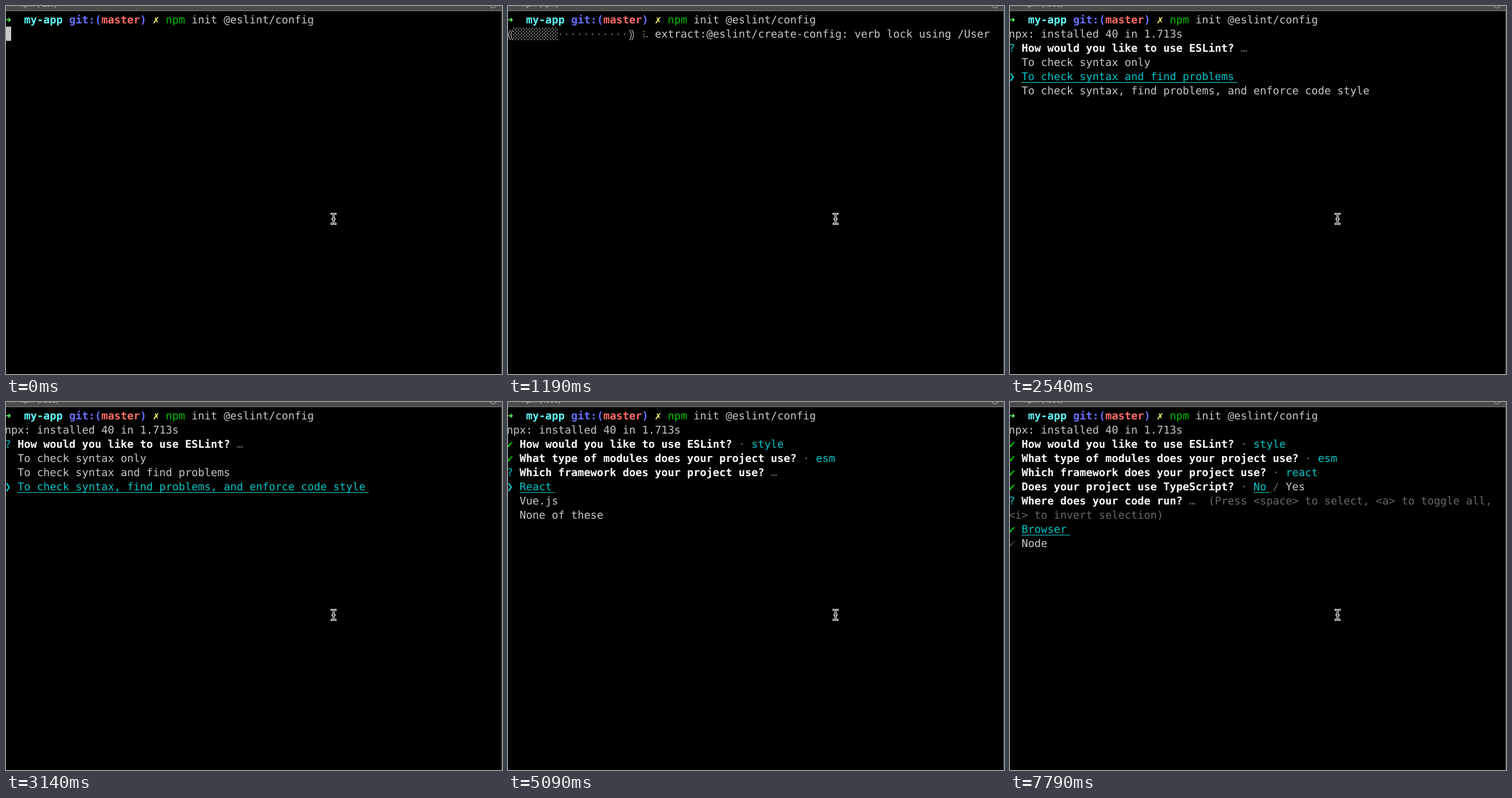
Recreate the animation shown at these times as an HTML page. Size 770 by 571 pixels, loop 8000 ms.

```html
<!DOCTYPE html>
<html lang="en">
<head>
<meta charset="utf-8">
<title>Terminal</title>
<style>
  html, body { margin: 0; width: 100%; height: 100%; overflow: hidden; background: #000; }
  svg { display: block; width: 770px; height: 571px; }
  text { white-space: pre; text-rendering: geometricPrecision; }
  .term { font: 16.61px "DejaVu Sans Mono", "Liberation Mono", monospace; }
  .bar { font: 11px Inter, "Liberation Sans", sans-serif; fill: #d2d2d2; }
</style>
</head>
<body>
<svg viewBox="0 0 770 571">
  <rect width="770" height="571"/>
  <rect x="769" width="1" height="571" fill="#4c4c4c"/>
  <rect width="770" height="7" fill="#4b4b4b"/>
  <rect y="7" width="770" height="1" fill="#757575"/>
  <path d="M3 0h2M10 0h2" stroke="#8c8c8c"/>
  <text id="title" class="bar" x="22" y="0.6"></text>
  <circle cx="756" cy="-2.5" r="5.5" fill="none" stroke="#b4b4b4"/>
  <g id="screen" class="term"></g>
  <g fill="none" stroke-linecap="square">
    <path id="beam" d="M505.5 322.5q3 0 3 2.5v10.500q0 2.500-3 2.500M511.500 322.500q-3 0-3 2.500v10.500q0 2.500 3 2.500M507 330.500h3" stroke="#fff" stroke-width="3"/>
    <path d="M505.500 322.500q3 0 3 2.500v10.500q0 2.500-3 2.500M511.500 322.500q-3 0-3 2.500v10.500q0 2.500 3 2.500M507 330.500h3" stroke="#000"/>
  </g>
</svg>
<script>
const LOOP = 8000, CELL = 10, ROW = 22, LEFT = -2;
const C = {
  text: '#c7c7c7', white: '#ffffff', cyan: '#00c5c7', green: '#00c200', dim: '#686868', faint: '#3b3b3b',
  lime: '#5ffa68', aqua: '#60fdff', blue: '#6871ff', red: '#ff6e67', yellow: '#fffc67'
};
const title = document.getElementById('title');
const screen = document.getElementById('screen');

const colX = col => LEFT + col * CELL;
const escape = s => s.replace(/&/g, '&amp;').replace(/</g, '&lt;');

// Drawing helpers: each one returns a function of the row number.
const run = (col, str, color = 'text', bold = false) => row =>
  `<text x="${colX(col)}" y="${27 + row * ROW}" fill="${C[color]}"` +
  `${bold ? ' font-weight="700"' : ''}>${escape(str)}</text>`;

const link = (col, str) => row => run(col, str, 'cyan')(row) +
  `<rect x="${colX(col)}" y="${30 + row * ROW}" width="${str.length * CELL + 5}" height="1" fill="${C.cyan}"/>`;

const block = row => `<rect y="${10 + row * ROW}" width="8" height="22" fill="${C.text}"/>`;

// Braille dots 1-3 fill the left column, 4-6 the right one.
const braille = (col, dots) => row => [...dots].map(d => {
  const x = colX(col) + (d > 3 ? 7.2 : 2.4);
  const y = 17 + ROW * row + (d - 1) % 3 * 4;
  return `<rect x="${x}" y="${y}" width="1.5" height="1.5" fill="${C.text}"/>`;
}).join('');

const doubleParen = (col, dir) => row => {
  const mid = colX(col) + 5, y = 15 + row * ROW;
  const arc = x => `M${mid + dir * x} ${y}q${-dir * 5.6} 8 0 16`;
  return `<path d="${arc(1)}${arc(4.4)}" fill="none" stroke="${C.text}" stroke-width="1.1"/>`;
};

const prompt = [
  run(0, '➜', 'lime', true), run(3, 'my-app', 'aqua', true), run(10, 'git:(', 'blue', true),
  run(15, 'master', 'red', true), run(21, ')', 'blue', true), run(23, '✗', 'yellow', true),
  run(25, 'npm', 'green'), run(29, 'init @eslint/config')
];

const gauge = (filled, spinner, label) => [
  doubleParen(0, 1),
  ...Array.from({ length: 18 }, (_, i) => i < filled ? run(i + 1, '░') : braille(i + 1, '2')),
  doubleParen(19, -1), braille(21, spinner), run(23, label.slice(0, 52))
];

const ask = (q, mark = '…') => [run(0, '?', 'cyan'), run(2, q, 'white', true), run(q.length + 3, mark, 'dim')];
const tick = (q, mark) => [run(0, '✔', 'green'), run(2, q, 'white', true), run(q.length + 3, mark, 'dim')];
const done = (q, answer) => [...tick(q, '·'), run(q.length + 5, answer, 'cyan')];
const menu = (items, pick) => items.map((s, i) => i === pick ? [run(0, '❯', 'cyan'), link(2, s)] : [run(2, s)]);
const noYes = [link(38, 'No'), run(41, '/', 'dim'), run(43, 'Yes')];

const Q = {
  use: 'How would you like to use ESLint?',
  modules: 'What type of modules does your project use?',
  framework: 'Which framework does your project use?',
  types: 'Does your project use TypeScript?',
  where: 'Where does your code run?'
};
const uses = [
  'To check syntax only',
  'To check syntax and find problems',
  'To check syntax, find problems, and enforce code style'
];
const modules = ['JavaScript modules (import/export)', 'CommonJS (require/exports)', 'None of these'];
const frameworks = ['React', 'Vue.js', 'None of these'];

const installed = [run(0, 'npx: installed 40 in 1.713s')];
const useDone = [installed, done(Q.use, 'style')];
const modulesDone = [...useDone, done(Q.modules, 'esm')];
const frameworkDone = [...modulesDone, done(Q.framework, 'react')];
const rollback = 'rollbackFailedOptional: verb npm-session 5f0c2b91d7e';

// Start time, window title, rows below the prompt.
const steps = [
  [0, '-zsh', [[block]]],
  [450, 'npm', [[block]]],
  [600, 'npm', [gauge(0, '3456', rollback)]],
  [740, 'npm', [gauge(0, '236', rollback)]],
  [1040, 'npm', [gauge(0, '356', 'fetchMetadata: sill resolveWithNewModule @eslint/create-config')]],
  [1190, 'npm', [gauge(7, '1236', 'extract:@eslint/create-config: verb lock using /User')]],
  [1340, 'npm', [gauge(11, '123', 'extract:strip-json-comments: sill extract strip-json-comments')]],
  [1490, 'npm', [gauge(14, '1234', 'extract:semver: sill extract semver@7.3.5 extracted to /Users')]],
  [1640, 'npm', [[block]]],
  [1790, 'npm', [installed]],
  [1940, 'npm', [installed, ask(Q.use), ...menu(uses, 1)]],
  [2540, 'node', [installed, ask(Q.use), ...menu(uses, 1)]],
  [3140, 'node', [installed, ask(Q.use), ...menu(uses, 2)]],
  [3740, 'node', [...useDone, ask(Q.modules), ...menu(modules, 0)]],
  [5090, 'node', [...modulesDone, ask(Q.framework), ...menu(frameworks, 0)]],
  [6140, 'node', [...frameworkDone, [...ask(Q.types, '›'), ...noYes]]],
  [7790, 'node', [
    ...frameworkDone,
    [...tick(Q.types, '·'), ...noYes],
    [...ask(Q.where), run(31, '(Press <space> to select, <a> to toggle all,', 'dim')],
    [run(0, '<i> to invert selection)', 'dim')],
    [run(0, '✔', 'green'), link(2, 'Browser')],
    [run(0, '✔', 'faint'), run(2, 'Node')]
  ]]
];

const start = performance.now();
let shown = -1;

function draw() {
  const t = (performance.now() - start) % LOOP;
  const now = steps.findLastIndex(s => s[0] <= t);
  if (now !== shown) {
    shown = now;
    const [, name, rows] = steps[now];
    title.textContent = `npm (${name})`;
    screen.innerHTML = [prompt, ...rows].map((runs, row) => runs.map(r => r(row)).join('')).join('');
  }
  requestAnimationFrame(draw);
}
draw();
</script>
</body>
</html>
```
